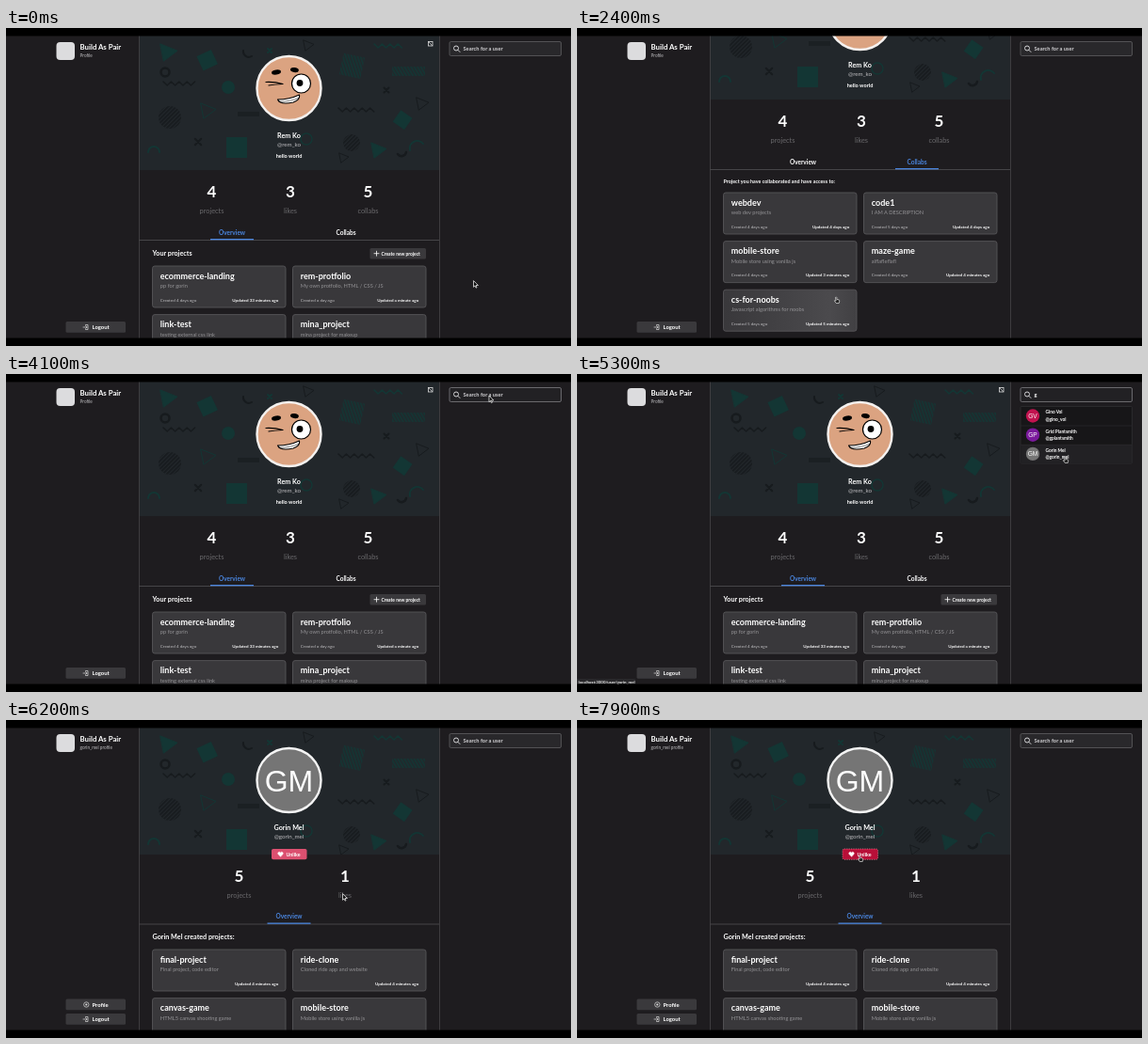
Write an HTML page that moves like this. It is 600x338 px and loops after 8 s.

```html
<!DOCTYPE html>
<html lang="en">
<head>
<meta charset="utf-8">
<title>Profile page demo</title>
<style>
html, body { margin: 0; width: 100%; height: 100%; overflow: hidden; background: #1e1c1f; }
svg { display: block; width: 100vw; height: 100vh; font-family: Lato, "Open Sans", sans-serif; }
</style>
</head>
<body>
<svg id="stage" viewBox="0 0 600 338"></svg>
<script>
const stage = document.getElementById('stage');
const LOOP = 8000, STEP = 100;
const BG = '#1e1c1f', LINE = '#464548', BLUE = '#4a85de', GREY = '#949396', SOFT = '#bdbcbf';
const TEAL = '#133634', DARK = '#171b1e';

// Key points: time, then values
const cursorKeys = [
  [0, 496.5, 269], [250, 560, 230], [550, 410, 275], [900, 362, 216], [1200, 362, 216],
  [1500, 345, 262], [1900, 285, 275], [2400, 275, 286], [2600, 275, 286], [2800, 243, 141],
  [2900, 243, 141], [3100, 514, 36], [3500, 510, 22], [4400, 514, 24], [4800, 519, 45],
  [5000, 519, 66], [5200, 518, 88], [5400, 518, 88], [5600, 478, 105], [6000, 390, 170],
  [6400, 325, 200], [6900, 321, 199], [7300, 318, 190], [7700, 300, 144], [8000, 300, 144]
];
const scrollKeys = [
  [1900, 0], [2200, 75], [2800, 75], [2900, 26], [3000, 26], [3100, 6], [3200, 0],
  [6400, 0], [6800, 69], [7200, 69], [7600, 0]
];
const fadeKeys = [[5400, 0], [5500, 1], [5600, .83], [5900, 0]];

function track(keys, t) {
  if (t <= keys[0][0]) return keys[0].slice(1);
  const i = keys.findIndex(k => k[0] > t);
  if (i < 0) return keys.at(-1).slice(1);
  const a = keys[i - 1], b = keys[i], p = (t - a[0]) / (b[0] - a[0]);
  const e = p * p * (3 - 2 * p);
  return a.slice(1).map((v, n) => v + (b[n + 1] - v) * e);
}

const rect = (x, y, w, h, fill, more = '') =>
  `<rect x="${x}" y="${y}" width="${w}" height="${h}" fill="${fill}" ${more}/>`;
const circle = (x, y, r, fill, more = '') =>
  `<circle cx="${x}" cy="${y}" r="${r}" fill="${fill}" ${more}/>`;
const path = (d, stroke, width = 1, fill = 'none') =>
  `<path d="${d}" stroke="${stroke}" stroke-width="${width}" fill="${fill}" stroke-linecap="round" stroke-linejoin="round"/>`;
const text = (x, y, size, str, { fill = '#fff', weight = 700, anchor = 'start', more = '' } = {}) =>
  `<text x="${x}" y="${y}" font-size="${size}" font-weight="${weight}" fill="${fill}" text-anchor="${anchor}" ${more}>${str}</text>`;
const mid = (x, y, size, str, o = {}) => text(x, y, size, str, { anchor: 'middle', ...o });

const defs = `<defs>
  <pattern id="stripes" width="3" height="3" patternUnits="userSpaceOnUse" patternTransform="rotate(45)">${rect(0, 0, 1.8, 3, DARK)}</pattern>
  <pattern id="tealStripes" width="3" height="3" patternUnits="userSpaceOnUse" patternTransform="rotate(-30)">${rect(0, 0, 1.6, 3, TEAL)}</pattern>
  <linearGradient id="cardHover" x2="1"><stop stop-color="#39383b"/><stop offset=".8" stop-color="#4b4a4d"/><stop offset="1" stop-color="#414043"/></linearGradient>
</defs>`;

const overview = [
  ['ecommerce-landing', 'pp for gorin', 'Created 4 days ago', 'Updated 33 minutes ago'],
  ['rem-protfolio', 'My own protfolio, HTML / CSS / JS', 'Created a day ago', 'Updated a minute ago'],
  ['link-test', 'testing external css link', 'Created 5 days ago', 'Updated 4 days ago'],
  ['mina_project', 'mina project for makeup', 'Created 5 days ago', 'Updated 4 days ago']
];
const collabs = [
  ['webdev', 'web dev projects', 'Created 4 days ago', 'Updated 4 days ago'],
  ['code1', 'I AM A DESCRIPTION', 'Created 5 days ago', 'Updated 4 days ago'],
  ['mobile-store', 'Mobile store using vanilla js', 'Created 4 days ago', 'Updated 3 minutes ago'],
  ['maze-game', 'alflafleflafl', 'Created 6 days ago', 'Updated 4 minutes ago'],
  ['cs-for-noobs', 'Javascript algorithms for noobs', 'Created 5 days ago', 'Updated 5 minutes ago']
];
const created = [
  ['final-project', 'Final project, code editor', '', 'Updated 4 minutes ago'],
  ['ride-clone', 'Cloned ride app and website', '', 'Updated 4 minutes ago'],
  ['canvas-game', 'HTML5 canvas shooting game', '', 'Updated 4 minutes ago'],
  ['mobile-store', 'Mobile store using vanilla js', '', 'Updated 5 minutes ago'],
  ['cs-for-noobs', 'Javascript algorithms for noobs', '', 'Updated 5 minutes ago']
];
const users = [
  ['GV', 'Gino Vol', 'gino_vol', '#c2134f'],
  ['GP', 'Grid Plantsmith', 'gplantsmith', '#7a1a9c'],
  ['GM', 'Gorin Mel', 'gorin_mel', '#757575']
];

function zigzag(x, y, n, color) {
  let d = `M${x} ${y}`;
  for (let i = 1; i <= n; i++) d += `L${x + i * 4.2} ${y + (i % 2 ? 4 : 0)}`;
  return path(d, color, 1.6);
}

function banner(bottom) {
  const tri = (x, y, s, stroke, fill) => path(`M${x} ${y}l${s} ${s * .4}l${-s * .8} ${s * .6}z`, stroke, 1, fill);
  const cross = (x, y, s, c) => path(`M${x - s} ${y - s}l${2 * s} ${2 * s}m0 ${-2 * s}l${-2 * s} ${2 * s}`, c, 2);
  return rect(141, 0, 319, bottom, '#22272b') +
    circle(174, 95, 12, 'url(#stripes)') + circle(367, 122, 9, 'url(#stripes)') +
    circle(169, 47, 4.5, 'none', `stroke="${DARK}" stroke-width="2.5"`) +
    circle(319, 118, 6, 'none', `stroke="${TEAL}" stroke-width="1.5"`) +
    circle(236, 63, 7, TEAL) + rect(234, 116, 22, 22, TEAL) +
    rect(410, 41, 35, 10, 'url(#tealStripes)') +
    rect(356, 29, 23, 23, 'url(#tealStripes)', 'transform="rotate(12 368 40)"') +
    rect(205, 26, 17, 17, TEAL, 'transform="rotate(-25 213 34)"') +
    rect(414, 90, 15, 15, TEAL, 'transform="rotate(35 421 97)"') +
    rect(246, 89, 23, 5, DARK, 'opacity=".6"') +
    tri(164, 17, 18, TEAL, TEAL) + tri(316, 13, 11, DARK, 'none') + tri(207, 80, 16, TEAL, 'none') +
    tri(354, 133, 10, DARK, 'none') + tri(388, 122, 16, TEAL, TEAL) + tri(436, 74, 13, DARK, 'none') +
    zigzag(167, 57, 8, DARK) + zigzag(353, 85, 9, DARK) + zigzag(391, 17, 7, TEAL) +
    cross(204, 121, 3.2, DARK) + cross(280, 24, 2, TEAL) + cross(404, 66, 2.5, DARK) +
    path('M416 134a5 5 0 0 0 9 -2', DARK, 2.5) + path('M429 130a8 8 0 0 1 14 -7', TEAL, 2) +
    path('M151 132a6 6 0 0 1 12 0', TEAL, 2) + path('M252 24a6 6 0 0 0 9 6', DARK, 2);
}

const face = circle(300.5, 64, 34, '#dba381', 'stroke="#f4f1ef" stroke-width="2.4"') +
  '<ellipse cx="287" cy="47" rx="5" ry="2.5" transform="rotate(-8 287 47)"/>' +
  '<ellipse cx="306.5" cy="44.5" rx="4.5" ry="2.5" transform="rotate(10 306 44)"/>' +
  path('M276 57.5Q285 57 294 59.5Q285 60 279 61', '#000', 1.2) +
  circle(313.5, 59, 10, '#fff', 'stroke="#000" stroke-width="1.2"') + circle(312, 58.5, 3.4, '#000') +
  path('M288.5 76Q301 76 311.5 71Q313 76 305 79Q291 82 288.5 76Z', '#000', 1.1, '#fff') +
  path('M290 78.2Q302 78.5 311.5 74', '#000', .5);

const initials = circle(300.5, 64, 34, '#757575', 'stroke="#f4f4f4" stroke-width="2.4"') +
  mid(300.5, 75.7, 32, 'GM', { weight: 400, more: 'font-family="Liberation Sans, sans-serif"' });

function stat(x, y, value, label) {
  return mid(x, y, 17, value) + mid(x, y + 17.3, 7.4, label, { fill: '#69686b', weight: 400 });
}

function tab(x, y, label, active) {
  return mid(x, y, 6.5, label, { fill: active ? BLUE : '#fff' }) +
    (active ? rect(x - 23, y + 4.5, 46, 1.3, BLUE) : '');
}

function cards(list, top, over) {
  return list.map(([title, desc, made, updated], i) => {
    const x = 155.5 + (i % 2) * 149, y = top + (i >> 1) * 51.6;
    const fill = over(x, y, 141.5, 44) ? 'url(#cardHover)' : '#39383b';
    return rect(x, y, 141.5, 44, fill, 'rx="2.5" stroke="#565558" stroke-width=".9"') +
      text(x + 8.3, y + 13.7, 9, title) +
      text(x + 8.3, y + 22.9, 5.7, desc, { fill: GREY, weight: 400 }) +
      text(x + 8.3, y + 37.5, 4.6, made, { fill: SOFT, weight: 400 }) +
      text(x + 133.8, y + 37.5, 4.5, updated, { anchor: 'end' });
  }).join('');
}

function ownPage(tabName, over) {
  const first = tabName === 'Overview';
  over(217, 208, 46, 17);
  over(338, 208, 46, 17);
  return banner(151) + rect(141, 151, 319, 400, BG) + face +
    rect(448.5, 14.5, 4.5, 4.5, 'none', 'stroke="#ddd" stroke-width=".8"') + path('M449 15l3.5 3.5', '#ddd', .7) +
    mid(300.5, 117, 7.2, 'Rem Ko') + mid(300.5, 126, 6.2, '@rem_ko', { fill: SOFT, weight: 400 }) +
    mid(300.5, 138, 5.6, 'hello world') +
    stat(218.5, 179.5, 4, 'projects') + stat(302, 179.5, 3, 'likes') + stat(384.5, 179.5, 5, 'collabs') +
    rect(141, 225, 319, 1, LINE) + tab(240, 219.5, 'Overview', first) + tab(361, 219.5, 'Collabs', !first) +
    (first
      ? text(155.5, 242, 7.2, 'Your projects') +
        rect(386.5, 234, 59.5, 11.5, over(386, 234, 60, 12) ? '#4a494c' : '#3a393c', 'rx="1.5"') +
        path('M391 239.7h5m-2.5 -2.5v5', '#fff', .8) + text(398.5, 241.5, 4.9, 'Create new project') +
        cards(overview, 253, over)
      : text(155.5, 240, 5.4, 'Project you have collaborated and have access to:') + cards(collabs, 250, over));
}

function otherPage(t, over) {
  const hot = over(282, 137, 38, 12);
  const fill = t < 5800 ? '#3f6fae' : hot ? '#b80f38' : '#dc5070';
  over(278, 200, 46, 17);
  return banner(143) + rect(141, 143, 319, 400, BG) + initials +
    mid(300.5, 117, 7.2, 'Gorin Mel') + mid(300.5, 126, 6.2, '@gorin_mel', { fill: SOFT, weight: 400 }) +
    rect(282, 137, 37.5, 11.3, fill, 'rx="1.8"' + (hot ? ' stroke="#e88aa0" stroke-width=".7" stroke-dasharray="1.2 1.2"' : '')) +
    path('M291.5 145.3l-2.6 -2.7a1.5 1.5 0 0 1 2.6 -1.6a1.5 1.5 0 0 1 2.6 1.6z', '#fff', .4, '#fff') +
    text(297.5, 144.5, 5.3, 'Unlike') +
    stat(247.5, 171.5, 5, 'projects') + stat(360, 171.5, 1, 'likes') +
    rect(141, 216.5, 319, 1, LINE) + tab(300.5, 211, 'Overview', true) +
    text(155.5, 233, 7.2, 'Gorin Mel created projects:') + cards(created, 244, over);
}

function sideButton(y, label, over) {
  const icon = label === 'Logout'
    ? path(`M82 ${y + 6}h4m-1.5 -1.5l1.5 1.5l-1.5 1.5m0 -4h2.5v5h-2.5`, '#ddd', .7)
    : circle(85.3, y + 6, 2.7, 'none', 'stroke="#ddd" stroke-width=".7"') + circle(85.3, y + 6, 1.1, '#ddd');
  return rect(63.5, y, 63.5, 11.7, over(63, y, 64, 12) ? '#4a494c' : '#3a393c', 'rx="1.5"') +
    icon + text(91.5, y + 8, 5.9, label);
}

function sidebars(t, other, over) {
  const focus = t >= 3700 && !other, typed = t >= 4300 && !other;
  let out = rect(0, 0, 141, 338, BG) + rect(460, 0, 140, 338, BG) +
    rect(141, 0, .8, 338, LINE) + rect(460, 0, .8, 338, LINE) +
    rect(53.5, 15, 19.5, 19, '#dcdcde', 'rx="4"') +
    text(78.5, 22.8, 7.8, 'Build As Pair') +
    text(78.5, 30.5, 4.7, other ? 'gorin_mel profile' : 'Profile', { fill: SOFT, weight: 400 }) +
    (other ? sideButton(296.5, 'Profile', over) : '') + sideButton(312, 'Logout', over) +
    rect(471, 14.5, 118.5, 15, focus ? '#222124' : '#29282b', `rx="1.5" stroke="${focus ? '#737276' : '#59585b'}" stroke-width=".9"`) +
    circle(478, 21.5, 2.5, 'none', 'stroke="#e4e4e6" stroke-width=".9"') + path('M480 23.5l2 2', '#e4e4e6', .9) +
    text(485.5, 24, 5.7, typed ? 'g' : 'Search for a user', { fill: typed ? '#fff' : '#d2d1d4' });
  if (t < 4400 || other) return out;
  out += rect(471, 34.5, 118.5, 60.5, '#171618', 'rx="1" stroke="#323134" stroke-width=".7"');
  users.forEach(([tag, name, id, color], i) => {
    const y = 34.5 + i * 20.2, hot = over(471, y, 118.5, 20);
    if (hot) out += rect(471.4, y, 117.7, 20, '#222124') +
      rect(0, 324, 62, 7, '#29282b') + text(1.5, 328.7, 4.4, `localhost:3000/user/${id}`, { fill: '#eee' });
    out += (i ? rect(471, y, 118.5, .6, '#2c2b2e') : '') +
      circle(484, y + 10, 7.2, color) +
      mid(484, y + 12.4, 6.6, tag, { weight: 400, more: 'font-family="Liberation Sans, sans-serif"' }) +
      text(497.5, y + 7.9, 4.8, name) + text(497.5, y + 15.2, 4.8, `@${id}`);
  });
  return out;
}

function pointer(x, y, hand) {
  const shape = hand
    ? path('M-.3 .2q1 -.8 1.3 .4v2.2l2.6 .6q1 .4 .8 1.6l-.6 2.6h-3.6l-2.2 -3q0 -1 1.7 -.1z', '#fff', .7, '#222')
    : path('M0 0v6.3l1.5 -1.4l1 2.3l1 -.5l-1 -2.2h2z', '#fff', .7, '#111');
  return `<g transform="translate(${x} ${y})${hand ? ' scale(.85)' : ''}">${shape}</g>`;
}

function render(t) {
  const [cx, cy] = track(cursorKeys, t), [scroll] = track(scrollKeys, t), [fade] = track(fadeKeys, t);
  const other = t >= 5500, loaded = fade === 0;
  let hand = false;
  const hit = shift => (x, y, w, h) => {
    const inside = loaded && cx > x && cx < x + w && cy + shift > y && cy + shift < y + h;
    hand ||= inside;
    return inside;
  };
  const tabName = t >= 1100 && t < 2900 ? 'Collabs' : 'Overview';
  const page = other ? otherPage(t, hit(scroll)) : ownPage(tabName, hit(scroll));
  stage.innerHTML = defs + rect(0, 0, 600, 338, BG) +
    `<g transform="translate(0 ${-scroll})">${page}</g>` + sidebars(t, other, hit(0)) +
    rect(0, 0, 600, 8.5, '#000') + rect(0, 329.5, 600, 8.5, '#000') +
    rect(0, 0, 600, 338, '#000', `opacity="${fade}"`) + pointer(cx, cy, hand);
}

const start = performance.now();
let shown = -1;
function tick() {
  const t = Math.floor((performance.now() - start) % LOOP / STEP) * STEP;
  if (t !== shown) render(shown = t);
  requestAnimationFrame(tick);
}
tick();
</script>
</body>
</html>
```
